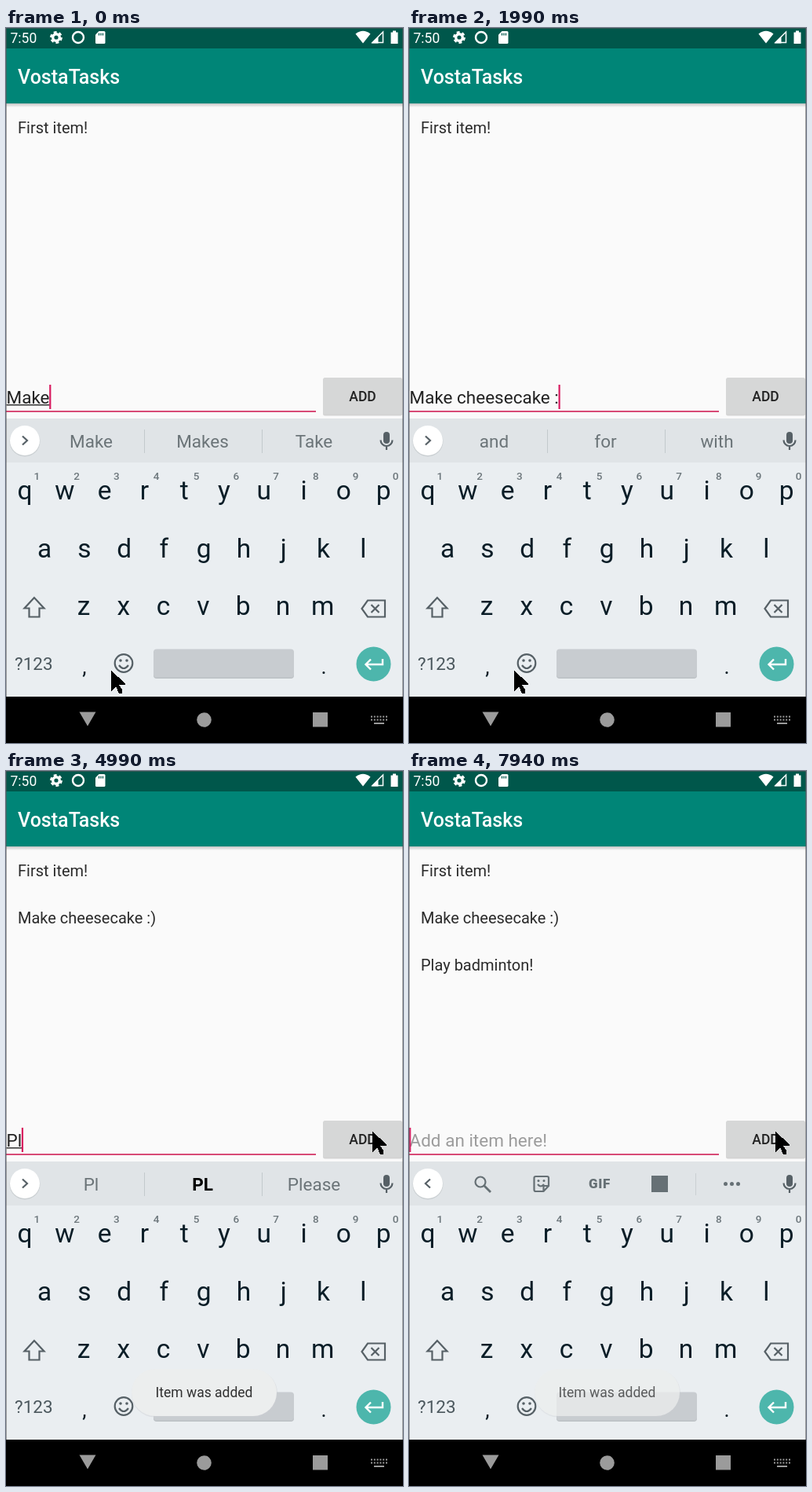
An HTML page that plays this animation: 506 px wide and 910 px high, repeating every 8 s.

```html
<!DOCTYPE html>
<html lang="en">
<head>
<meta charset="utf-8">
<title>To-do list</title>
<style>
html, body { margin: 0; width: 100%; height: 100%; overflow: hidden; background: #fafafa; }
svg { display: block; width: 100%; height: 100%; font-family: Roboto, "Noto Sans", sans-serif; }
text { white-space: pre; }
.mid { text-anchor: middle; }
.key { font-size: 33.5px; fill: #0a1d27; text-anchor: middle; }
.num { font-size: 13.5px; font-weight: 500; fill: #6d777c; text-anchor: middle; }
.item { font-size: 20px; fill: #2b2b2b; }
.edit { font-size: 22.5px; fill: #222; }
.line { fill: none; stroke: #566066; stroke-width: 2.2; }
.nav { fill: #9b9b9b; }
</style>
</head>
<body>
<svg viewBox="0 0 506 910" xmlns="http://www.w3.org/2000/svg">
  <rect width="506" height="910" fill="#fafafa"/>
  <defs>
    <linearGradient id="shade" x2="0" y2="1">
      <stop stop-color="#c4c4c4"/><stop offset="1" stop-color="#fafafa"/>
    </linearGradient>
  </defs>

  <rect y="96" width="506" height="5" fill="url(#shade)"/>
  <rect width="506" height="26" fill="#00574b"/>
  <rect y="26" width="506" height="70" fill="#008577"/>
  <text x="15" y="71" font-size="25" font-weight="500" fill="#fff">VostaTasks</text>

  <g id="status" fill="#fff">
    <text x="5.5" y="18.500" font-size="17.5">7:50</text>
    <circle cx="64" cy="12" r="4.300" fill="none" stroke="#fff" stroke-width="3.400"/>
    <circle cx="64" cy="12" r="6.600" fill="none" stroke="#fff" stroke-width="2.600" stroke-dasharray="3.900 3.010"/>
    <circle cx="92" cy="12" r="7" fill="none" stroke="#fff" stroke-width="2.400"/>
    <path d="M118.500 4H125q1.500 0 1.500 1.500V18.500q0 1.500-1.500 1.500H115.500q-1.500 0-1.500-1.500V8.500Z"/>
    <path d="M118.500 6.500v3m2.500-3v3m2.500-3v3" stroke="#00574b" stroke-width="1.300"/>
    <path d="M455 19.500L445.500 7.500Q455 0 464.500 7.500Z"/>
    <path d="M467 18.500H480.500V5Z" fill="none" stroke="#fff" stroke-width="1.500"/>
    <path d="M466 19.500L474.500 11V19.500Z"/>
    <path d="M490.500 5.500h2.500v-2h4v2h2.500V20h-9Z"/>
  </g>

  <g id="list"></g>

  <text id="hint" class="edit" x=".5" y="478" style="fill:#9c9c9c">Add an item here!</text>
  <text id="typed" class="edit" x=".5" y="478"></text>
  <rect id="compose" y="479" height="1.500" fill="#333"/>
  <rect x="0" y="487" width="395" height="2" fill="#d84a76"/>
  <rect id="caret" y="454" width="2.200" height="31" fill="#d81b60"/>

  <rect x="404" y="447" width="101" height="46.500" rx="2.500" fill="#c3c4c4" opacity=".7"/>
  <rect id="button" x="404" y="445" width="101" height="46.500" rx="2.500"/>
  <text class="mid" x="454.500" y="474.500" font-size="17.5" font-weight="500" fill="#222">ADD</text>

  <rect y="497" width="506" height="56" fill="#e0e4e7"/>
  <rect y="553" width="506" height="298" fill="#eaeef1"/>
  <circle cx="24" cy="526" r="19.500" fill="#cbd0d3"/>
  <circle cx="24" cy="525" r="19" fill="#fff"/>
  <path id="chevron" class="line"/>
  <g fill="#566066">
    <rect x="481" y="514" width="8" height="15" rx="4"/>
    <path class="line" d="M477.500 524.500a7.500 7.500 0 0 0 15 0M485 532v5" stroke-width="2"/>
  </g>

  <g id="words">
    <path d="M176.500 511v30M326.500 511v30" stroke="#c3c9cc"/>
    <g id="slots" font-size="22.5"></g>
  </g>
  <g id="tools" fill="#667075">
    <g class="line" style="stroke:#667075">
      <circle cx="91" cy="523" r="6.500"/>
      <path d="M95.500 527.500L104 536" stroke-width="2.800"/>
      <path d="M161.500 516H176q2 0 2 2V528L171.500 535H161.500q-2 0-2-2V518q0-2 2-2ZM171.500 535V528H178"/>
      <path d="M164 526q4 5 8 0"/>
    </g>
    <circle cx="165" cy="521.500" r="1.500"/><circle cx="172" cy="521.500" r="1.500"/>
    <text class="mid" x="243" y="531" font-size="17" font-weight="900" letter-spacing=".7">GIF</text>
    <rect x="309" y="515" width="21" height="21"/>
    <path d="M365.500 512v28" stroke="#cbd0d3"/>
    <circle cx="403.500" cy="525.500" r="2.500"/><circle cx="411.500" cy="525.500" r="2.500"/><circle cx="419.500" cy="525.500" r="2.500"/>
  </g>

  <g id="keys"></g>
  <path id="shift" class="line" d="M36 725L23.500 738.500H29.500V749.500H42.500V738.500H48.500Z"/>
  <path class="line" d="M461 728.500H483V749.500H461L453.500 739ZM465.500 734l10 10m0-10l-10 10"/>
  <text x="11" y="817" font-size="22.5" fill="#4c585e">?123</text>
  <text class="key" x="100" y="822" style="font-size:27px">,</text>
  <text class="key" x="405" y="822" style="font-size:27px">.</text>
  <circle class="line" cx="150" cy="808.500" r="11.300"/>
  <path class="line" d="M144 811q6 8 12 0" stroke-width="2"/>
  <circle cx="146" cy="805" r="1.800" fill="#566066"/><circle cx="154" cy="805" r="1.800" fill="#566066"/>
  <rect x="188" y="792" width="179" height="36" rx="4" fill="#bcc1c5"/>
  <rect x="188" y="790.500" width="179" height="36" rx="4" fill="#c8ccd0"/>
  <circle cx="468.500" cy="809.500" r="22" fill="#4db6ac"/>
  <path d="M480 803v7H459M465 803.500L458.500 810l6.500 6.500" fill="none" stroke="#fff" stroke-width="2.400"/>

  <g id="toast">
    <rect x="160" y="762" width="186" height="60.500" rx="30" fill="#c9cdd0" opacity=".45"/>
    <rect x="160" y="761" width="185" height="60" rx="30" fill="#eceeee"/>
    <text class="mid" x="252.500" y="797" font-size="17.5" fill="#303030">Item was added</text>
  </g>

  <rect y="851" width="506" height="59"/>
  <path class="nav" d="M93.500 870.500H114.500L104 888.500Z"/>
  <circle class="nav" cx="252.500" cy="880.500" r="9.300"/>
  <rect class="nav" x="391" y="871" width="19" height="18.500"/>
  <path d="M465 876.500h21M465 880.500h21" stroke="#9b9b9b" stroke-width="2" stroke-dasharray="2 1.800"/>
  <path d="M469 885h13" stroke="#9b9b9b" stroke-width="2"/>

  <path d="M.5 0V851M505.500 0V851M0 .5H506" stroke="#555" stroke-opacity=".55" fill="none"/>
  <path id="pointer" d="M0 0L18 16V18H10L14 24V29H10L6 20L0 26Z" shape-rendering="crispEdges"/>
</svg>

<script>
const LOOP = 8000, START = 0.5;
const $ = id => document.getElementById(id);
const show = (id, on) => $(id).setAttribute('visibility', on ? 'visible' : 'hidden');
const within = (t, ...spans) => spans.some(([a, b]) => t >= a && t < b);
const latest = (rows, t) => rows.filter(r => r[0] <= t).pop();

// [time, text], "_" opens the underlined word
const typing = [
  [0, '_Make'], [120, 'Make _c'], [270, 'Make _ch'], [390, 'Make _che'],
  [510, 'Make _chee'], [630, 'Make _chees'], [780, 'Make _cheese'],
  [930, 'Make _cheesec'], [1080, 'Make _cheeseca'], [1200, 'Make _cheesecak'],
  [1320, 'Make _cheesecake'], [1560, 'Make cheesecake '],
  [1990, 'Make cheesecake :'], [2260, 'Make cheesecake :)'], [3680, ''],
  [4840, '_P'], [4990, '_Pl'], [5140, '_Pla'], [5260, '_Play'], [5410, 'Play '],
  [5660, 'Play _b'], [5810, 'Play _ba'], [5930, 'Play _badm'], [6050, 'Play _badmi'],
  [6200, 'Play _badmin'], [6350, 'Play _badminton'], [6850, 'Play badminton!'], [7550, '']
];

// [time, suggestions], "*" marks bold, empty shows the tool icons
const strips = [
  [0, 'Make|Makes|Take'], [120, 'c|can|call'], [270, 'ch|*ch|chocolate'],
  [390, 'che|check|cheese'], [510, 'chee|*cheese|cheeses'], [630, 'chees|*cheese|cheeses'],
  [780, 'cheese|cheesecake|cheesecakes'], [930, 'cheesec|*cheesecake|cheesecakes'],
  [1080, 'cheeseca|*cheesecake|cheesecakes'], [1200, 'cheesecak|*cheesecake|cheesecakes'],
  [1320, 'cheesecake|cheesecakes|cheese'], [1560, 'and|for|with'], [3830, ''],
  [4990, 'Pl|*PL|Please'], [5140, 'Pla|*Play|Plan'], [5260, 'Play|Plays|Player'],
  [5410, 'with|the|and'], [5810, 'ba|*be|back'], [5930, 'badm|*badminton|'],
  [6050, 'badmi|*badminton|'], [6200, 'badmin|*badminton|'],
  [6350, 'badminton|Badminton|'], [6970, '']
];

const items = [[0, 'First item!'], [3830, 'Make cheesecake :)'], [7700, 'Play badminton!']];
const toast = [
  [0, 0], [3950, .35], [4080, .75], [4200, 1], [5930, .75], [6050, .4], [6200, 0],
  [7820, .4], [7940, .75]
];

const pen = document.createElement('canvas').getContext('2d');
function widthOf(text, weight = 400) {
  pen.font = `${weight} 22.5px Roboto, "Noto Sans", sans-serif`;
  return pen.measureText(text).width;
}

const rows = [['qwertyuiop', 24, 600], ['asdfghjkl', 49, 673.5], ['zxcvbnm', 99, 747]];
$('keys').innerHTML = rows.map(([letters, x, y], row) => [...letters].map((c, i) => {
  const kx = x + i * 50.8;
  const num = row ? '' : `<text class="num" x="${kx + 15.3}" y="575">${(i + 1) % 10}</text>`;
  return `<text class="key" x="${kx}" y="${y}">${c}</text>${num}`;
}).join('')).join('');
const keys = [...document.querySelectorAll('#keys .key')];

$('list').innerHTML = items.map(([, text], i) =>
  `<text class="item" x="15" y="${134 + i * 60}">${text}</text>`).join('');

function drawWord(word, i) {
  const bold = word[0] === '*', text = word.replace('*', '');
  const fit = Math.min(1, 118 / (widthOf(text, bold ? 700 : 400) || 1));
  const style = bold ? 'font-weight="700" fill="#000"' : 'fill="#6b7478"';
  return `<text class="mid" transform="translate(${[108.5, 250.5, 392.5][i]} 534) scale(${fit} 1)" ${style}>${text}</text>`;
}

function drawField(t) {
  const raw = latest(typing, t)[1], text = raw.replace('_', '');
  const mark = raw.indexOf('_'), end = START + widthOf(text);
  const from = mark < 0 ? end : START + widthOf(text.slice(0, mark));
  $('typed').textContent = text;
  $('compose').setAttribute('x', from);
  $('compose').setAttribute('width', end - from);
  $('caret').setAttribute('x', end - 0.3);
  show('hint', !text);
  show('caret', !within(t, [2690, 3170], [4200, 4690], [7430, 7550]));
}

let lastStrip;
function drawStrip(t) {
  const strip = latest(strips, t)[1];
  if (strip === lastStrip) return;
  lastStrip = strip;
  show('words', strip);
  show('tools', !strip);
  $('slots').innerHTML = strip ? strip.split('|').map(drawWord).join('') : '';
  $('chevron').setAttribute('d', strip ? 'M21 519.500l6 5.500l-6 5.500' : 'M27 519.500l-6 5.500l6 5.500');
}

let lastUpper;
function drawKeys(t) {
  const upper = within(t, [1840, 1990], [2110, 2260]);
  if (upper === lastUpper) return;
  lastUpper = upper;
  for (const k of keys) k.textContent = upper ? k.textContent.toUpperCase() : k.textContent.toLowerCase();
  $('shift').style.fill = upper ? '#566066' : 'none';
}

function drawPointer(t) {
  const step = Math.max(0, Math.min(5, Math.floor((t - 2690) / 120) + 1)) / 5;
  const p = step * step * (3 - 2 * step);
  $('pointer').setAttribute('transform', `translate(${Math.round(134 + 333 * p)} ${Math.round(818 - 359 * p)})`);
}

function render(t) {
  drawField(t);
  drawStrip(t);
  drawKeys(t);
  drawPointer(t);
  items.forEach(([at], i) => $('list').children[i].setAttribute('visibility', t >= at ? 'visible' : 'hidden'));
  $('toast').setAttribute('opacity', latest(toast, t)[1]);
  $('button').setAttribute('fill', within(t, [3560, 4080], [7430, 7820]) ? '#c6c7c7' : '#d6d7d7');
}

const begin = performance.now();
function tick() {
  render((performance.now() - begin) % LOOP);
  requestAnimationFrame(tick);
}
tick();
</script>
</body>
</html>
```
